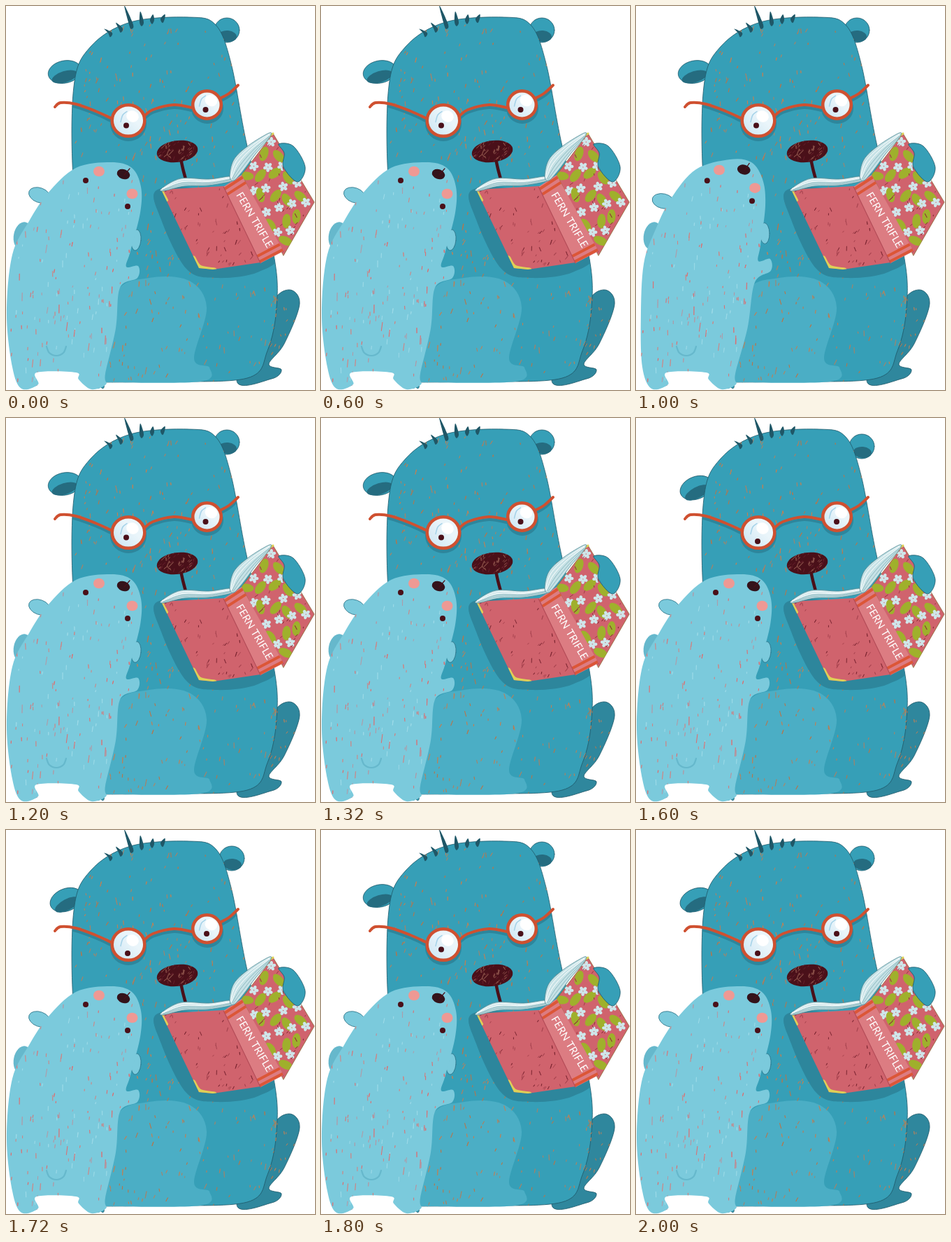
Recreate the animation shown at these times as an HTML page with a canvas. Size 442 by 548 pixels, loop 2200 ms.

```html
<!DOCTYPE html>
<html lang="en">
<head>
<meta charset="utf-8">
<title>Reading bears</title>
<style>
html, body { margin: 0; width: 100%; height: 100%; overflow: hidden; background: #fff; }
canvas { display: block; }
</style>
</head>
<body>
<canvas id="stage" width="442" height="548"></canvas>
<script>
const ctx = document.getElementById('stage').getContext('2d');
const C = {
  bear: '#369fb7', lap: '#4baec5', leg: '#2f879d', shade: '#2d869c', deep: '#256c80', hair: '#1f5767',
  cub: '#7bcadc', cubShade: '#66b8cc', frame: '#cf5030', maroon: '#4a1019', cover: '#d0636d',
  spine: '#dc7c82', stripe: '#dc5637', green: '#9fb02c', flower: '#cfe6ea', page: '#c6e2e6', yellow: '#ded157'
};

function seeded(seed) {
  return () => {
    seed = (seed * 1664525 + 1013904223) >>> 0;
    return seed / 4294967296;
  };
}

// Smooth curve through a list of points
function curve(p, closed = true) {
  const n = p.length, path = new Path2D();
  const at = i => closed ? p[(i + n) % n] : p[Math.max(0, Math.min(n - 1, i))];
  path.moveTo(...p[0]);
  for (let i = 0; i < (closed ? n : n - 1); i++) {
    const [a, b, c, d] = [at(i - 1), at(i), at(i + 1), at(i + 2)];
    path.bezierCurveTo(b[0] + (c[0] - a[0]) / 6, b[1] + (c[1] - a[1]) / 6,
      c[0] - (d[0] - b[0]) / 6, c[1] - (d[1] - b[1]) / 6, c[0], c[1]);
  }
  return path;
}

function poly(p) {
  const path = new Path2D();
  p.forEach(q => path.lineTo(...q));
  path.closePath();
  return path;
}

function ellipse([x, y], rx, ry, turn = 0) {
  const path = new Path2D();
  path.ellipse(x, y, rx, ry, turn, 0, Math.PI * 2);
  return path;
}

function line(path, color, width) {
  ctx.strokeStyle = color;
  ctx.lineWidth = width;
  ctx.stroke(path);
}

function fill(path, color, edge) {
  ctx.fillStyle = color;
  ctx.fill(path);
  if (edge) line(path, edge, 0.8);
}

function within(path, draw) {
  ctx.save();
  ctx.clip(path);
  draw();
  ctx.restore();
}

const mix = (a, b, k) => [a[0] + (b[0] - a[0]) * k, a[1] + (b[1] - a[1]) * k];

// Short scratches scattered over a box
function specks({ seed, box: [x0, y0, x1, y1], count, min, more, lean, colors, move = p => p }) {
  const rnd = seeded(seed);
  for (let i = 0; i < count; i++) {
    const [x, y] = move([x0 + rnd() * (x1 - x0), y0 + rnd() * (y1 - y0)]);
    const len = min + rnd() * rnd() * more, slant = (rnd() - 0.35) * lean;
    const color = colors[Math.floor(rnd() * colors.length)];
    line(poly([[x, y], [x - slant * len, y + len]]), color, 0.6 + rnd() * 0.6);
  }
}

const body = curve([[97,260], [97,115], [121,58], [178,23], [262,16], [300,27], [322,82], [345,200], [383,355],
  [387,430], [374,492], [345,531], [220,536], [140,537], [140,537], [120,420]]);
const lap = curve([[138,537], [156,413], [205,388], [262,392], [287,430], [269,503], [291,516], [278,536], [138,537]]);
const leg = curve([[376,430], [404,405], [420,425], [398,482], [376,511], [394,519], [380,532], [330,534]]);

function ears(perk) {
  ctx.save();
  if (perk) {
    ctx.translate(106, 97);
    ctx.rotate(-0.18);
    ctx.translate(-104, -95);
  }
  fill(ellipse([84, 94], 24, 16, -0.2), C.bear, C.hair);
  fill(ellipse([84, 101], 19, 8, -0.3), C.deep);
  ctx.restore();
  ctx.save();
  if (perk) ctx.translate(7, 6);
  fill(ellipse([316, 34.5], 18, 17.5), C.bear, C.hair);
  fill(ellipse([317, 43], 13, 8, 0.1), C.deep);
  ctx.restore();
}

function hair() {
  [13, 14, 33, 19, 12, 11].forEach((len, i) => {
    const x = 149 + i * 15, y = 22 + 20 * ((235 - x) / 85) ** 2, lean = 0.2 * i - 0.7;
    const tip = [x + Math.sin(lean) * len, y - Math.cos(lean) * len];
    fill(curve([tip, [x + 3, y - 4], [x, y + 2], [x - 3, y - 4]]), C.hair);
  });
}

function lens(x, y, rx, ry, pupil) {
  const tint = ctx.createLinearGradient(x - rx, y + ry, x + rx, y - ry);
  tint.addColorStop(0.1, '#cfe7f4');
  tint.addColorStop(0.6, '#eaf5fa');
  fill(ellipse([x, y], rx, ry), tint);
  fill(ellipse([x + 6, y - 6], 9, 8, 0.5), '#fff');
  line(curve([[x - 11, y + 2], [x - 8, y - 8], [x - 2, y - 13]], false), '#a5d2e8', 1.5);
  line(ellipse([x, y], rx, ry), C.frame, 4.5);
  fill(ellipse(pupil, 4, 4), C.maroon);
}

function glasses(perk) {
  const bars = [
    [[70,144], [78,138], [100,140], [128,150], [150,160]],
    [[198,157], [210,148], [240,141], [266,145]],
    [[308,131], [320,124], [332,113]]
  ].map(p => curve(p, false));
  within(body, () => {
    ctx.translate(0, 4);
    bars.forEach(b => line(b, C.shade, 4));
    fill(ellipse([175, 164], 26, 25), C.shade);
    fill(ellipse([288, 142], 23, 22), C.shade);
  });
  bars.forEach(b => line(b, C.frame, 4));
  lens(175, 163.5, 23.3, 22.3, perk ? [174, 176] : [172, 170.5]);
  lens(287.5, 141, 20.3, 19.7, perk ? [287, 148] : [285.5, 148]);
}

function snout() {
  const nose = ellipse([245, 207.5], 29.5, 15.5, -0.13);
  line(curve([[250,218], [253,232], [257,247]], false), C.maroon, 4.5);
  fill(nose, C.maroon);
  within(nose, () => specks({ seed: 9, box: [216,190,274,222], count: 60, min: 2, more: 7, lean: 2.2,
    colors: ['#8a5048', '#651f2b'] }));
}

function flower([x, y]) {
  for (let a = x; a < x + 6; a += Math.PI * 0.4) {
    fill(ellipse([x + Math.cos(a) * 3.8, y + Math.sin(a) * 3.8], 3.2, 2.3, a), C.flower);
  }
}

function backCover() {
  const [a, b, c, d] = [[337,241], [382,182], [441,280], [397,356]];
  const shape = poly([a, b, c, d]), rnd = seeded(12);
  fill(shape, C.cover, '#8c6a35');
  within(shape, () => {
    for (let row = 0; row < 7; row++) {
      for (let col = 0; col < 4; col++) {
        const u = (col + 0.2 + rnd() * 0.5) / 4, v = (row + 0.2 + rnd() * 0.5) / 7;
        const spot = mix(mix(a, b, u), mix(d, c, u), v);
        if ((row + col) % 2) flower(spot);
        else fill(ellipse(spot, 10.5, 6, rnd() * 3), C.green);
      }
    }
    specks({ seed: 31, box: [340,185,440,350], count: 50, min: 1, more: 6, lean: 2, colors: ['#8d2d39', '#a33f49'] });
  });
  line(poly([[372,188], b]), C.yellow, 3);
}

function frontCover() {
  const shape = poly([[222,262], [312,257], [364,366], [296,376], [276,374]]);
  fill(shape, C.cover);
  within(shape, () => {
    specks({ seed: 77, box: [222,258,355,372], count: 75, min: 1.5, more: 8, lean: 1.5, colors: ['#7f2834', '#a84450'] });
    line(poly([[222,262], [230,277]]), C.yellow, 4);
    line(curve([[268,360], [277,373], [298,377]], false), C.yellow, 7);
  });
}

function spine() {
  const [a, b, c, d] = [[311,258], [337,241], [397,350], [364,367]];
  const shape = poly([a, b, c, d]);
  fill(shape, C.spine);
  within(shape, () => {
    for (const k of [0.03, 0.1, 0.91, 0.98]) line(poly([mix(a, d, k), mix(b, c, k)]), C.stripe, 4);
  });
  line(poly([a, d]), '#b74e5a', 1);
  ctx.save();
  ctx.translate(356, 305);
  ctx.rotate(1.04);
  ctx.font = '15px Lato, "Open Sans", sans-serif';
  ctx.textAlign = 'center';
  ctx.textBaseline = 'middle';
  ctx.fillStyle = '#fff';
  ctx.fillText('FERN TRIFLE', 0, 1);
  ctx.restore();
}

// A bundle of sheets between two edges of the same point count
function pages(top, bottom) {
  fill(curve([...top, ...bottom.slice().reverse()]), C.page, '#4c8792');
  for (let k = 0.2; k < 1; k += 0.2) {
    line(curve(top.map((p, i) => mix(p, bottom[i], k)), false), k > 0.5 ? '#8fb9c0' : '#fff', 1);
  }
}

function book() {
  within(body, () => fill(curve([[217,262], [222,305], [258,375], [300,388], [360,380], [386,350], [300,270]]), C.shade));
  backCover();
  frontCover();
  spine();
  pages([[223,260], [250,246], [290,247], [321,243]], [[225,264], [255,257], [290,256], [326,249]]);
  pages([[320,243], [326,219], [347,199], [377,181]], [[326,249], [340,234], [357,211], [376,189]]);
  fill(curve([[390,197], [411,200], [428,230], [417,251], [397,230], [398,210]]), C.bear, C.hair);
}

function bear(perk) {
  ears(perk);
  fill(leg, C.leg, C.hair);
  fill(body, C.bear, C.hair);
  fill(lap, C.lap);
  const orange = ['#b8754a', '#c47f52', '#a98267'];
  within(body, () => specks({ seed: 2024, box: [98,20,386,535], count: 430, min: 2, more: 9, lean: 0.9, colors: orange }));
  within(leg, () => specks({ seed: 5, box: [375,408,420,510], count: 20, min: 2, more: 6, lean: 1.2, colors: orange }));
  hair();
  glasses(perk);
  snout();
  book();
}

// Leans the cub back around its chest; the feet stay put
function bend([x, y]) {
  const turn = -0.127 * Math.max(0, Math.min(1, (473 - y) / 70));
  const [dx, dy, c, s] = [x - 110, y - 345, Math.cos(turn), Math.sin(turn)];
  return [110 + dx * c - dy * s, 345 + dx * s + dy * c];
}

function cub(nod) {
  const pose = nod ? bend : p => p;
  const shape = curve([[33,307], [60,267], [100,231], [150,223], [180,231], [193,258], [192,295], [178,350], [172,372],
    [189,371], [188,388], [163,402], [157,460], [142,525], [143,540], [122,547], [104,533], [100,523], [44,523],
    [46,540], [22,546], [9,515], [1,440], [9,355]].map(pose));
  const tilt = nod ? -0.127 : 0;

  fill(ellipse([24, 328], 13, 20, 0.2), C.cubShade);
  fill(ellipse(pose([48, 270]), 16, 10.5, 0.35 + tilt), C.cub, C.deep);
  fill(ellipse(pose([186, 334]), 7, 15, 0.1 + tilt), C.cub, C.deep);
  fill(shape, C.cub);
  within(shape, () => {
    const red = ['#dd6d70', '#d3807f', '#b397a4', '#9edbe8'];
    specks({ seed: 51, box: [15,245,192,410], count: 85, min: 2, more: 10, lean: 0.35, colors: red, move: pose });
    specks({ seed: 63, box: [5,400,155,542], count: 85, min: 3, more: 13, lean: 0.25, colors: red, move: pose });
  });
  line(curve([[58,486], [62,495], [72,499], [82,495], [86,486]], false), C.cubShade, 2.2);

  for (const p of [[133,236], [180.5,268]]) fill(ellipse(pose(p), 8, 7.3), '#ee9994');
  for (const p of [[114,249], [174,286]]) fill(ellipse(pose(p), 4, 4), C.maroon);
  fill(ellipse(pose([168, 240]), 9.5, 7, 0.35 + tilt), '#34131b');
  line(poly([[169, 241], [177, 232]].map(pose)), C.maroon, 1.2);
}

ctx.lineCap = ctx.lineJoin = 'round';
const start = performance.now();
let shown = '';

// A long rest, then the cub nods twice and the big bear perks up twice
function tick(now) {
  const t = Math.max(0, now - start) % 2200;
  const beat = t < 1000 ? 0 : 1 + Math.floor((t - 1000) / 200);
  const nod = beat === 1 || beat === 3, perk = beat === 4 || beat === 6;
  const pose = nod + '/' + perk;
  if (pose !== shown) {
    ctx.fillStyle = '#fff';
    ctx.fillRect(0, 0, 442, 548);
    bear(perk);
    cub(nod);
    shown = pose;
  }
  requestAnimationFrame(tick);
}
tick(start);
</script>
</body>
</html>
```
